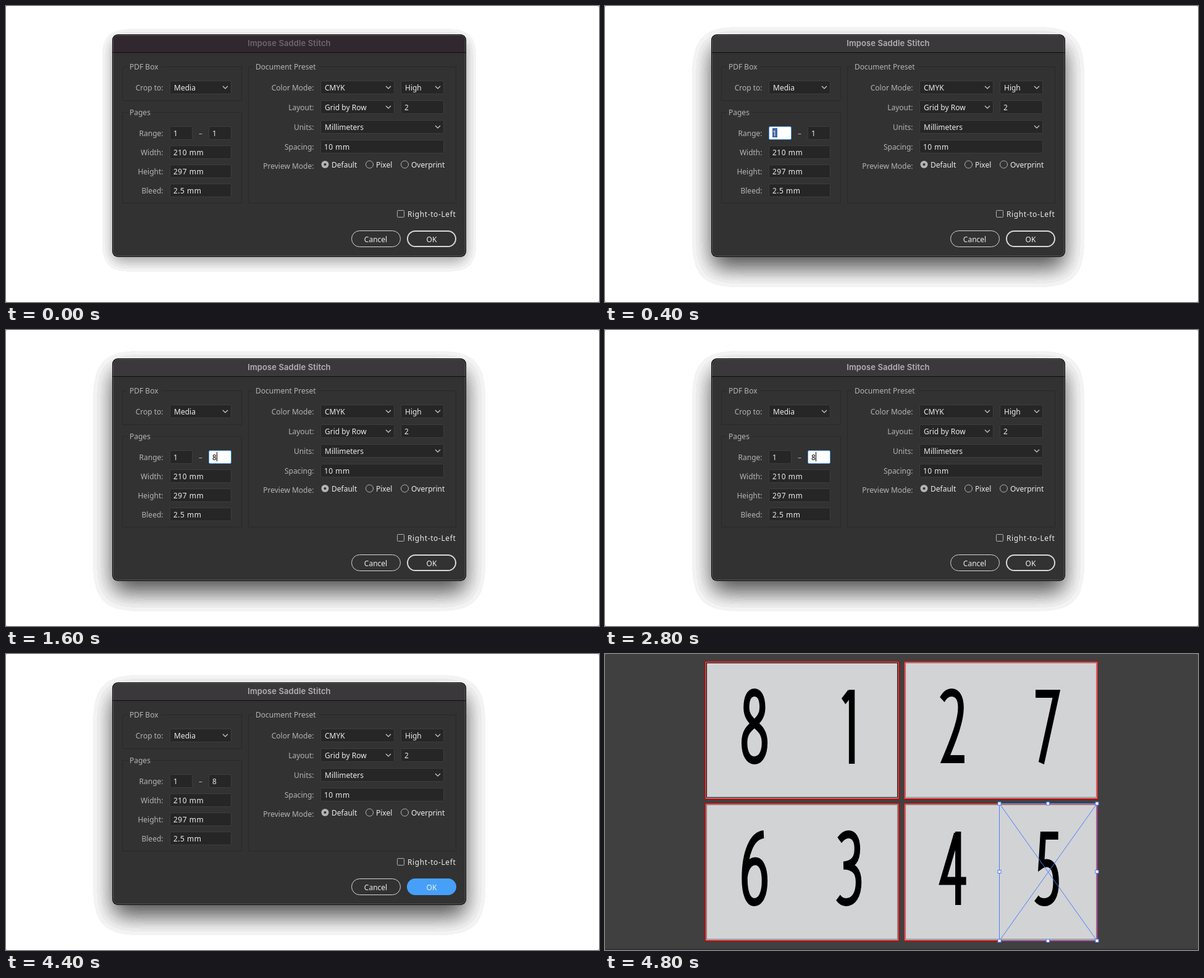
Animation of 960 by 480 pixels, one loop 6300 ms. Source, as an HTML page:

```html
<!DOCTYPE html>
<html lang="en">
<head>
<meta charset="utf-8">
<title>Impose Saddle Stitch</title>
<style>
  html, body { margin: 0; width: 100%; height: 100%; overflow: hidden; background: #8a8a8a; }
  svg { display: block; font: 12px "Noto Sans", "Open Sans", sans-serif; }
  .label { fill: #b4b4b4; }
  .value { fill: #ececec; font-weight: 500; }
  .title { font: 600 13px Inter, Roboto, sans-serif; letter-spacing: .1px; }
  .box { fill: #262626; stroke: #3d3d3d; }
  .group, .line { fill: none; stroke: #282828; }
  .chevron { fill: none; stroke: #d0d0d0; stroke-width: 1.2; }
  .ring { fill: none; stroke: #b4b4b4; }
  .digit { fill: none; stroke: #000; stroke-width: 13; }
  .selection { fill: none; stroke: #4a7dff; }
  .handle { fill: #fff; stroke: #4a7dff; }
</style>
</head>
<body>
<svg id="stage" width="960" height="480" viewBox="0 0 960 480"></svg>
<script>
const LOOP = 6300;
const RELEASED = 4700, DONE = 4800;

const rect = (x, y, w, h, attrs = '') =>
  `<rect x="${x}" y="${y}" width="${w}" height="${h}" ${attrs}/>`;
const text = (x, y, str, attrs = 'class="value"') => `<text x="${x}" y="${y}" ${attrs}>${str}</text>`;
const path = (d, attrs) => `<path d="${d}" ${attrs}/>`;
const layer = (id, content) => `<g id="${id}">${content}</g>`;

const label = (right, y, str) => text(right, y, str, 'class="label" text-anchor="end"');
const number = (x, y, str) => text(x, y, str, 'class="value" letter-spacing=".5"');
const box = (x, y, w, h = 22) => rect(x + .5, y + .5, w - 1, h - 1, 'class="box" rx="2"');
const input = (x, y, w, str) => box(x, y, w) + number(x + 6, y + 16, str);
const select = (x, y, w, str) => box(x, y, w) + text(x + 7, y + 16, str) +
  path(`M${x + w - 14} ${y + 9}l4 4l4 -4`, 'class="chevron"');

function group(x, y, right, bottom, gap, title) {
  return path(`M${x + 8} ${y}H${x}V${bottom}H${right}V${y}H${gap}`, 'class="group"') +
    text(x + 11.5, y + 4.5, title, 'class="label"');
}

function shadowFilter(id, sigma) {
  const steps = 30;
  const table = Array.from({ length: steps }, (_, i) => i ? (i + .5) / steps : 0).join(' ');
  return `<filter id="${id}" filterUnits="userSpaceOnUse" x="0" y="0" width="960" height="480">
    <feGaussianBlur stdDeviation="${sigma}"/>
    <feComponentTransfer><feFuncA type="discrete" tableValues="${table}"/></feComponentTransfer></filter>`;
}
const shadow = (id, filter, dy, opacity) =>
  layer(id, `<g filter="url(#${filter})">${rect(172, 46 + dy, 573, 361, `rx="9" fill-opacity="${opacity}"`)}</g>`);

// Glyph strokes, drawn wide and narrowed so that stems are thinner than bars.
const GLYPHS = {
  1: 'M4.4 18.8L19.4 4.8M23 0V120',
  2: 'M4 18C10 10 16 6.5 25 6.5C38 6.5 46 15 46 31C46 50 34 75 11 114.5H54',
  3: 'M5 16C11 10 17 6.5 25 6.5C38 6.5 45 15 45 30C45 47 35 56 14 57C38 57 48 67 48 84C48 105 36 116.5 20 116.5C13 116.5 7 114 2 109',
  4: 'M62 80H10L41 4M44 0V119',
  5: 'M51 6.5H17L13 54C18 51.5 20 51 25 51C39 51 46 62 46 82C46 104 36 114.5 20 114.5C12 114.5 6 112 2 108',
  6: 'M50 6.5C24 8 7 36 7 78C7 102 15 116.5 29 116.5C43 116.5 52 103 52 82C52 62 44 50 31 50C20 50 10 58 7 76',
  7: 'M0 6.5H47L13 119',
  8: 'M29 57C18 49 11 43 11 31C11 15 18 6.5 29 6.5C40 6.5 47 15 47 31C47 43 40 49 29 57C14 66 6.5 73 6.5 88C6.5 105 15 116.5 29 116.5C43 116.5 52 105 52 88C52 73 44 66 29 57Z'
};
const digit = (n, x, y) => path(GLYPHS[n], `class="digit" transform="translate(${x} ${y}) scale(.72 1)"`);

const spreads = [[162, 12], [484, 12], [162, 242], [484, 242]];

const blankSpread = ([x, y], i) =>
  rect(x + 2.5, y + 2, 309, 219, `fill="#fff" stroke="${i ? '#777' : '#000'}"`) +
  path(`M${x} ${y + 1}h312M${x} ${y + 222}h312` + (x < 200 ? `M${x + 1} ${y}v223` : ''),
    'stroke="#e60000" stroke-width="2"');

const filledSpread = ([x, y], i) =>
  rect(x + .75, y + .75, 312.5, 222, 'fill="#d2d3d5" stroke="#f00" stroke-width="1.5"') +
  rect(x + 2.5, y + 2.5, 309, 218, `fill="none" stroke="${i ? '#777' : '#000'}"`);

function selection() {
  const xs = [638.5, 717, 796.5], ys = [242.5, 353, 465];
  const [left, , right] = xs, [top, , bottom] = ys;
  let out = path(`M${left} ${top}H${right}V${bottom}H${left}ZL${right} ${bottom}M${right} ${top}L${left} ${bottom}`,
    'class="selection"');
  for (const x of xs) for (const y of ys)
    if (x !== xs[1] || y !== ys[1]) out += rect(x - 2.5, y - 2.5, 5, 5, 'class="handle"');
  return out;
}

const focusField = (id, x, content) =>
  layer(id, rect(x + .5, 195.5, 36, 21, 'rx="2" fill="#fff" stroke="#3d92ee"') + content);
const selectedOne = x => rect(x + 6, 198, 8, 15, 'fill="#41699c"') + number(x + 6, 211, 1);

const dialog =
  shadow('softShadow', 'softBlur', 7.5, .4) + shadow('deepShadow', 'deepBlur', 18.5, .7) +
  rect(172, 46, 573, 361, 'rx="9" fill="#000"') +
  rect(173.5, 47.5, 570, 358, 'rx="8" fill="#323232" stroke="#606060"') +
  path('M174 75V55.5Q174 48 181.5 48H735.5Q743 48 743 55.5V75Z', 'id="titleBar"') +
  path('M173 75.5H744', 'stroke="#0c0c0c"') +
  text(458.5, 65, 'Impose Saddle Stitch', 'id="titleText" class="title" text-anchor="middle"') +

  group(188.5, 98.5, 381.5, 153.5, 251, 'PDF Box') +
  label(254.5, 137, 'Crop to:') + select(265, 121, 100, 'Media') +

  group(188.5, 172.5, 381.5, 319.5, 238, 'Pages') +
  label(254.5, 211, 'Range:') + input(265, 195, 37, 1) + text(312, 211, '–', 'class="label"') + box(328, 195, 37) +
  `<text id="lastPage" class="value" x="334" y="211"></text>` +
  [['Width:', '210 mm'], ['Height:', '297 mm'], ['Bleed:', '2.5 mm']].map(([name, value], i) =>
    label(254.5, 242 + 31 * i, name) + input(265, 226 + 31 * i, 100, value)).join('') +

  group(392.5, 98.5, 728.5, 319.5, 507, 'Document Preset') +
  ['Color Mode:', 'Layout:', 'Units:', 'Spacing:'].map((name, i) => label(498.5, 137 + 32 * i, name)).join('') +
  select(509, 121, 120, 'CMYK') + select(639, 121, 70, 'High') +
  select(509, 153, 120, 'Grid by Row') + input(639, 153, 70, 2) +
  select(509, 185, 200, 'Millimeters') + input(509, 217, 200, '10 mm') +
  label(498.5, 264, 'Preview Mode:') +
  '<circle cx="516.5" cy="257" r="6" fill="#b4b4b4"/><circle cx="516.5" cy="257" r="2" fill="#323232"/>' +
  [588.5, 645.5].map(x => `<circle class="ring" cx="${x}" cy="257" r="6"/>`).join('') +
  text(527, 262, 'Default') + text(599, 262, 'Pixel') + text(656, 262, 'Overprint') +
  rect(633.5, 331.5, 11, 11, 'class="ring" rx="1"') +
  text(650, 342, 'Right-to-Left', 'class="value" letter-spacing=".6"') +

  rect(559.5, 364.5, 79, 26, 'rx="13" fill="none" stroke="#d8d8d8"') +
  text(598.5, 383, 'Cancel', 'class="value" text-anchor="middle"') +
  rect(650, 365, 78, 25, 'id="okShape" rx="12.5" stroke-width="2"') +
  text(689, 383, 'OK', 'id="okText" text-anchor="middle" font-weight="500"') +

  focusField('firstFocus', 265, selectedOne(265)) +
  focusField('lastFocus', 328,
    layer('lastSelected', selectedOne(328)) +
    layer('lastTyped', text(334, 211, 8, 'fill="#000"')) +
    rect(341, 198, 1, 15, 'id="caret"'));

const result = spreads.map(filledSpread).join('') +
  digit(8, 221, 56) + digit(1, 383, 58) + digit(2, 543, 56) + digit(7, 697, 58) +
  digit(6, 221, 286) + digit(3, 376, 286) + digit(4, 540, 288) + digit(5, 697, 288) + selection();

const stage = document.getElementById('stage');
stage.innerHTML =
  `<defs>${shadowFilter('softBlur', 12)}${shadowFilter('deepBlur', 19)}</defs>` +
  rect(0, 0, 960, 480, 'id="backdrop" rx="2"') +
  layer('workspace', path('M0 479H960', 'stroke="#352f31" stroke-width="2"')) +
  layer('blank', spreads.map(blankSpread).join('')) +
  layer('dialog', dialog) + layer('result', result);

const el = {};
stage.querySelectorAll('[id]').forEach(node => el[node.id] = node);
const show = (id, on) => el[id].style.display = on ? '' : 'none';
const fill = (id, color) => el[id].setAttribute('fill', color);

function render(t) {
  const during = (from, to) => t >= from && t < to;
  const active = during(400, RELEASED);
  const pressed = during(4400, RELEASED);
  const hover = t >= 3200;

  fill('backdrop', t < RELEASED ? '#fff' : '#404040');
  show('workspace', t >= RELEASED);
  show('blank', during(RELEASED, DONE));
  show('dialog', t < DONE);
  show('result', t >= DONE);

  show('softShadow', !active);
  show('deepShadow', active);
  fill('titleBar', active ? '#3a383a' : '#31272e');
  fill('titleText', active ? '#b2b0b2' : '#6e676c');

  show('firstFocus', during(400, 900));
  show('lastFocus', during(900, 4400));
  show('lastSelected', t < 1600);
  show('lastTyped', t >= 1600);
  show('caret', during(1600, 2200) || during(2800, 3300) || during(3900, 4400));
  el.lastPage.textContent = t < 1600 ? 1 : 8;

  const okColor = pressed ? '#46a0f9' : hover ? '#cccccc' : '#d8d8d8';
  fill('okShape', hover ? okColor : 'none');
  el.okShape.setAttribute('stroke', okColor);
  fill('okText', hover && !pressed ? '#3a3a3a' : '#f2f2f2');
}

const start = performance.now();
function tick() {
  render((performance.now() - start) % LOOP);
  requestAnimationFrame(tick);
}
tick();
</script>
</body>
</html>
```
